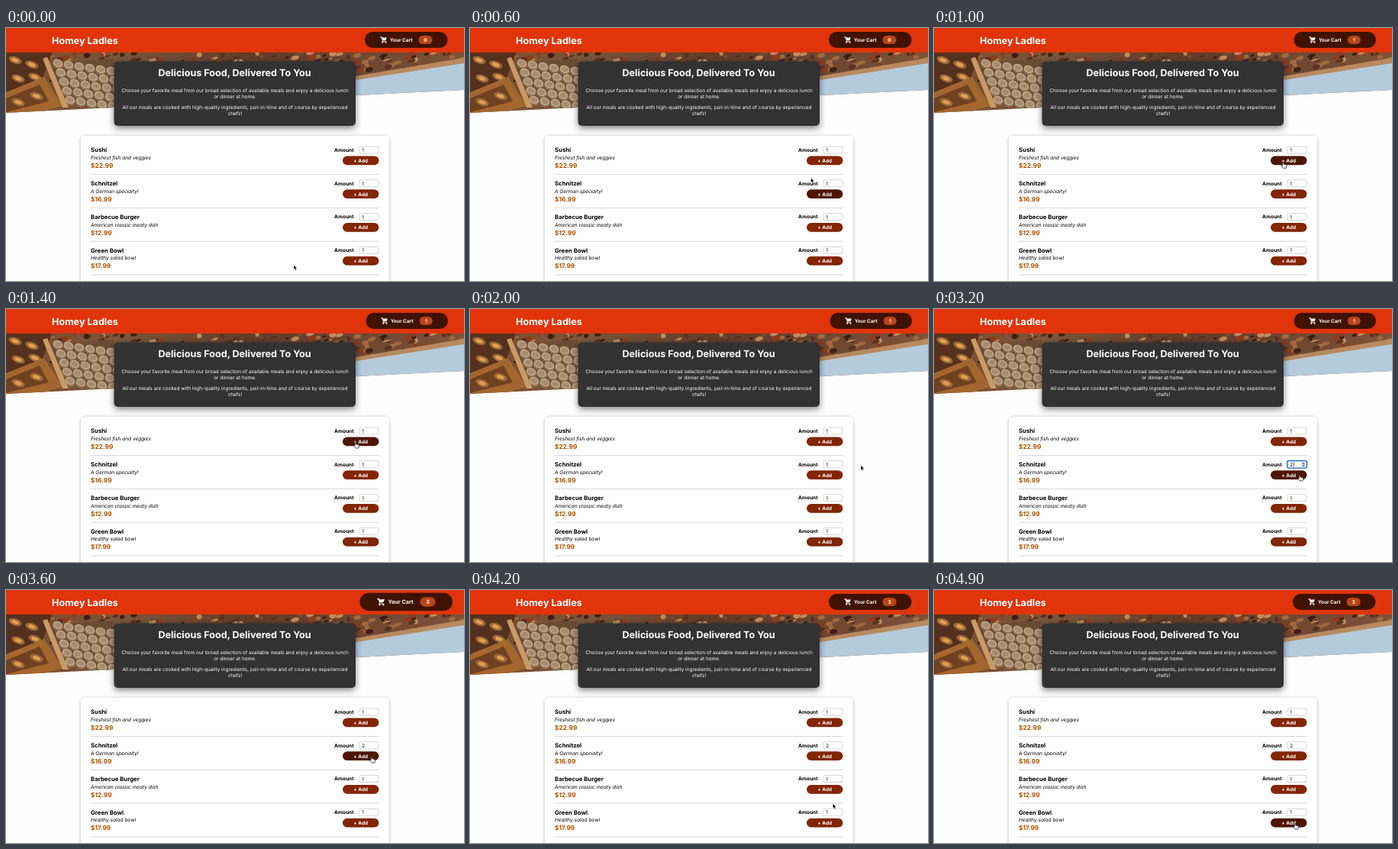
These frames come from a looping animation (600 px wide and 331 px high, 5 s). An HTML page:

```html
<!DOCTYPE html>
<html lang="en">
<head>
<meta charset="utf-8">
<title>Homey Ladles</title>
<style>
html, body { margin: 0; width: 100%; height: 100%; overflow: hidden; background: #fefefe; }
svg { display: block; width: 600px; height: 331px; font: 6.45px Inter, "Open Sans", sans-serif; text-rendering: geometricPrecision; }
text { white-space: pre; }
.b { font-weight: 700; }
.mid { text-anchor: middle; }
.white { fill: #fff; }
.title { font-size: 12.6px; font-weight: 700; fill: #fff; }
</style>
</head>
<body>
<svg viewBox="0 0 600 331">
  <defs>
    <clipPath id="slant"><path d="M0 32H600V81L0 111Z"/></clipPath>
    <linearGradient id="wood">
      <stop offset="0" stop-color="#7c4a29"/><stop offset=".24" stop-color="#7a563b"/>
      <stop offset=".55" stop-color="#5f3a28"/><stop offset="1" stop-color="#7d5338"/>
    </linearGradient>
    <filter id="soft" x="-10%" y="-20%" width="120%" height="150%"><feDropShadow dx="0" dy="3" stdDeviation="4" flood-opacity=".5"/></filter>
    <filter id="faint"><feDropShadow dx="0" dy=".5" stdDeviation="2" flood-opacity=".27"/></filter>
  </defs>
  <g id="photo" clip-path="url(#slant)"><rect y="32" width="600" height="80" fill="url(#wood)"/></g>
  <rect width="600" height="32" fill="#e1340b"/>
  <text class="title" x="60" y="20.6">Homey Ladles</text>
  <g id="cart">
    <rect id="pill" y="5" height="21" rx="10.5" fill="#401200"/>
    <g id="inner">
      <path class="white" d="M490.5 11.3h1.8l.5 1.2h6.2l-1.6 3.7h-3.6l-.5 1h5v1h-6.3l1-2.1-1.7-3.7h-.8Z"/>
      <circle class="white" cx="493.2" cy="19.1" r=".9"/><circle class="white" cx="497.6" cy="19.1" r=".9"/>
      <text class="b white" x="503" y="18">Your Cart</text>
      <rect id="badge" y="10" height="11" rx="5.5" fill="#b94517"/>
      <text class="b white mid" id="count" x="549.5" y="18"></text>
    </g>
  </g>
  <rect x="141.5" y="43.5" width="316.5" height="84.5" rx="5" fill="#313131" filter="url(#soft)"/>
  <g class="mid white">
    <text class="title" x="299.5" y="63.2">Delicious Food, Delivered To You</text>
    <text x="300" y="83.6">Choose your favorite meal from our broad selection of available meals and enjoy a delicious lunch</text>
    <text x="300" y="91.6">or dinner at home.</text>
    <text x="300" y="105.7">All our meals are cooked with high-quality ingredients, just-in-time and of course by experienced</text>
    <text x="300" y="113.5">chefs!</text>
  </g>
  <rect x="98" y="141" width="404" height="220" rx="5.5" fill="#fff" filter="url(#faint)"/>
  <g id="rows"></g>
  <g id="focus">
    <rect x="462.7" y="198.5" width="25.8" height="9.6" rx="2" fill="none" stroke="#2f6fc4" stroke-width="1.4"/>
    <path d="M471.3 200v6.7" stroke="#000" stroke-width=".6"/>
    <rect x="481" y="199.6" width="6" height="7.5" rx="1" fill="#ddd"/>
    <path d="M482.5 202.6l1.5-1.8 1.5 1.8ZM482.5 204.3l1.5 1.8 1.5-1.8Z" fill="#444"/>
  </g>
  <g id="pointer">
    <path id="arrow" d="M0 0V6.2L1.4 5L2.3 7.1L3.4 6.6L2.5 4.5H4.4Z" stroke="#fff" stroke-width=".4"/>
    <path id="hand" d="M-.8 .6Q0-.6 .8 .6V3Q1.7 2.4 2.1 3.2Q3 2.7 3.4 3.5Q4.4 3.1 4.6 4.2V5.6L3.8 8H.2L-2.6 4.6Q-2.4 3.4-.8 4.6Z" fill="#fff" stroke="#000" stroke-width=".7"/>
  </g>
</svg>
<script>
const $ = id => document.getElementById(id);
const LOOP = 5000, STEP = 100, PITCH = 43.75;
const ADD_ONE = 1000, PICK_TWO = 2600, ADD_TWO = 3420;
const meals = [
  ["Sushi", "Freshest fish and veggies", "$22.99"],
  ["Schnitzel", "A German specialty!", "$16.99"],
  ["Barbecue Burger", "American classic meaty dish", "$12.99"],
  ["Green Bowl", "Healthy salad bowl", "$17.99"]
];
// Pointer path: time, x, y
const path = [
  [200, 377, 310], [400, 418, 262], [500, 445, 216], [600, 446.5, 196], [800, 457, 176],
  [1400, 458, 174], [1500, 458, 174], [2000, 512, 204.5], [2100, 512, 204.5], [2400, 484, 204],
  [2800, 483, 202], [2900, 483, 202], [3200, 479, 217], [3600, 479, 218], [3700, 479, 218],
  [4400, 474, 304], [4900, 473, 305]
];
const bump = [[0, 1], [.1, .9], [.3, 1.1], [.5, 1.15], [1, 1]];

function along(keys, t, i = 1) {
  if (t <= keys[0][0]) return keys[0][i];
  const n = keys.findIndex(k => k[0] >= t);
  if (n < 0) return keys.at(-1)[i];
  const a = keys[n - 1], b = keys[n];
  return a[i] + (b[i] - a[i]) * (t - a[0]) / (b[0] - a[0]);
}

function drawPhoto() {
  let seed = 7, out = "";
  const rand = () => (seed = seed * 16807 % 2147483647) / 2147483647;
  const blob = (x, y, rx, ry, fill, turn = 20) =>
    out += `<ellipse cx="${x}" cy="${y}" rx="${rx}" ry="${ry}" fill="${fill}" transform="rotate(${turn} ${x} ${y})"/>`;
  const poly = (d, fill) => out += `<path d="${d}" fill="${fill}"/>`;
  const tones = ["#3b1f15", "#a06a3c", "#8e3a1c", "#5a3020", "#c08c5c", "#6e4a38"];

  // Food along the top
  for (let i = 0; i < 260; i++)
    blob(60 + rand() * 540, 32 + rand() * 40, 2 + rand() * 4, 1 + rand() * 2.5, tones[i % 6], -15);

  // Stacked cups
  poly("M58 46L142 40V106L78 98Z", "#6b4b34");
  for (let r = 0; r < 5; r++) for (let c = 0; c < 6; c++) {
    const x = 68 + c * 14 + r * 4, y = 46 + r * 12 + c * 2;
    blob(x, y + 2, 7, 5.5, "#8a6d50");
    blob(x, y, 6.5, 5, "#bda486");
    blob(x, y, 4.5, 3.2, "#a68b6c");
  }

  // Trays and lamps on the left
  poly("M0 32H60L48 66L0 86Z", "#55301d");
  poly("M0 84L50 64L74 102L40 112H0Z", "#a4662f");
  poly("M0 92L44 74L56 96L0 110Z", "#70411f");
  poly("M48 40L54 38L82 104H74Z", "#c79a68");
  [[12, 42], [34, 48], [16, 66], [38, 64], [16, 97], [40, 89]].forEach(([x, y]) => {
    blob(x, y, 9, 4.5, "#9c6a3c");
    blob(x, y, 5, 2.5, "#e0a04c");
  });

  // Counter edge and cloth on the right
  poly("M440 66L600 39V47L440 72Z", "#b98a5e");
  poly("M440 71L600 46V92H440Z", "#b4cbdc");
  $("photo").innerHTML += out;
}

$("rows").innerHTML = meals.map(([name, info, price], i) => `
  <g transform="translate(0 ${i * PITCH})">
    <text class="b" x="111" y="162.4" font-size="7.75">${name}</text>
    <text x="111" y="172" font-size="6.5" font-style="italic">${info}</text>
    <text class="b" x="111" y="183.1" font-size="8.3" fill="#ad5502">${price}</text>
    <text class="b" x="430" y="161.9" font-size="6.6">Amount</text>
    <rect x="463" y="155" width="25" height="9" rx="1.5" fill="#fff" stroke="#bbb" stroke-width=".6"/>
    <text class="value" x="466.3" y="162">1</text>
    <rect class="add" x="441" y="167.4" width="47.5" height="11.8" rx="5.9"/>
    <text class="b white mid" x="464.7" y="175.8">+ Add</text>
    <path d="M111 191.6H488.5" stroke="#ccc" stroke-width=".8"/>
  </g>`).join("");
drawPhoto();
const buttons = document.querySelectorAll(".add"), values = document.querySelectorAll(".value");

function buttonAt(t) {
  const x = along(path, t), y = along(path, t, 2);
  return meals.findIndex((_, i) => x > 441 && x < 488.5 && y > 167.4 + i * PITCH && y < 179.2 + i * PITCH);
}

function draw(now) {
  const time = now % LOOP, t = time < 300 ? 0 : Math.floor(time / STEP) * STEP;
  const count = t < ADD_ONE ? 0 : t < ADD_TWO ? 1 : 3;
  const since = t - (count > 1 ? ADD_TWO : ADD_ONE);
  const scale = count ? along(bump, since / 300) : 1;
  const narrow = count === 1 ? 1 : 0;

  $("cart").setAttribute("transform", `translate(524.3 15.5) scale(${scale}) translate(-524.3 -15.5)`);
  $("pill").setAttribute("x", 470 + narrow * 1.5);
  $("pill").setAttribute("width", 108.5 - narrow);
  $("inner").setAttribute("transform", `translate(${narrow} 0)`);
  $("badge").setAttribute("x", 540.5 + narrow * .3);
  $("badge").setAttribute("width", 18 - narrow);
  $("count").textContent = count;

  values[1].textContent = t < PICK_TWO ? 1 : 2;
  $("focus").style.display = t >= PICK_TWO - STEP && t < ADD_TWO ? "" : "none";
  const hover = buttonAt(t - STEP), over = buttonAt(t) >= 0;
  buttons.forEach((b, i) => b.setAttribute("fill", i === hover ? "#4d1601" : "#822503"));
  $("pointer").setAttribute("transform", `translate(${along(path, t)} ${along(path, t, 2)})`);
  $("arrow").style.display = over ? "none" : "";
  $("hand").style.display = over ? "" : "none";
  requestAnimationFrame(() => draw(performance.now() - start));
}
const start = performance.now();
draw(0);
</script>
</body>
</html>
```
